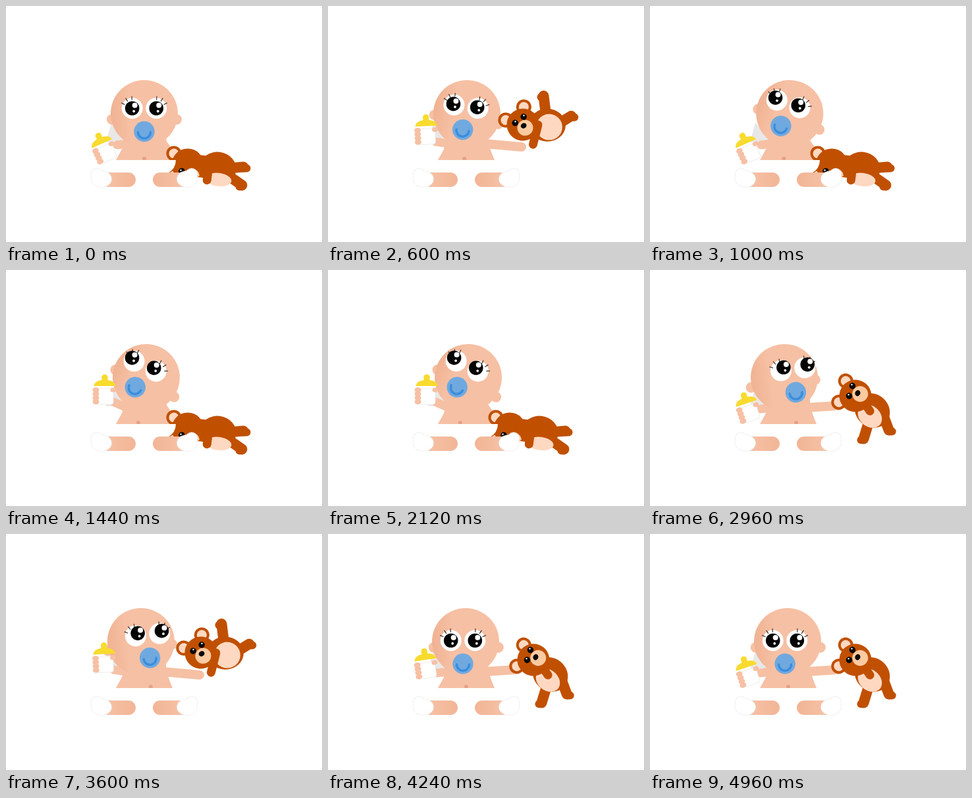
An HTML page with a canvas for the animation above (5000 ms loop, 480 by 360 pixels).

```html
<!DOCTYPE html>
<html lang="en">
<head>
<meta charset="utf-8">
<title>Baby with teddy</title>
<style>
html, body { margin: 0; width: 100%; height: 100%; overflow: hidden; background: #fff; }
canvas { display: block; width: 480px; height: 360px; }
</style>
</head>
<body>
<canvas id="stage" width="480" height="360"></canvas>
<script>
const c = document.getElementById('stage').getContext('2d');
const LOOP = 5000, STEP = 62.3, STEPS = 80, SHAKES = 15;
const SKIN = '#f6c0a4', SHADE = '#f0b292', FUR = '#c05000', PALE = '#ffd8c2', EDGE = '#ececec';
const RAD = Math.PI / 180;

// The baby looks around slowly: ahead, up to the bottle, up to the teddy, ahead.
const ahead = { x: 210, tilt: 0, faceX: 0, faceY: -8, gazeX: 0, gazeY: 0, navel: 210 };
const upLeft = { x: 213, tilt: 25, faceX: -9, faceY: -15, gazeX: -3, gazeY: -5, navel: 201 };
const upRight = { x: 204, tilt: -7, faceX: 14.5, faceY: -11, gazeX: 4, gazeY: -5, navel: 222 };
const settled = { ...ahead, x: 209, faceX: -4, faceY: -1.5 };
const looks = [
  [0, ahead], [1500, upLeft], [2250, upLeft], [2850, upRight],
  [3400, upRight], [4000, settled], [4940, settled], [LOOP, ahead]
];

// The teddy is beaten on the floor; spine, kick and flex are angles in degrees.
const floor = {
  x: 276, y: 242, tilt: -90, turn: -18, spine: 7, length: 46,
  kick: 28, flex: -10, belly: 17, reach: 20, handX: 254, handY: 232
};
const raised = {
  x: 296, y: 181, tilt: -36, turn: 0, spine: 1, length: 37,
  kick: -98, flex: -22, belly: 3, reach: 30, handX: 294, handY: 215
};
const hang = {
  x: 312, y: 192, tilt: -72, turn: 5, spine: 41, length: 34,
  kick: 66, flex: 9, belly: 9, reach: 3, handX: 285, handY: 207
};
const high = { ...raised, x: 304, y: 163, spine: -28, kick: -50, handX: 298, handY: 192 };
const shake = [
  [0, floor], [3, high], [5, floor], [6, floor], [8.5, high],
  [11, raised], [12, hang], [13, hang], [16, floor]
];

function poseAt(timeline, t) {
  const next = timeline.findIndex(([start]) => start > t);
  const [t0, a] = timeline[next - 1], [t1, b] = timeline[next];
  const k = (t - t0) / (t1 - t0), ease = k * k * (3 - 2 * k);
  const pose = {};
  for (const key in a) pose[key] = a[key] + (b[key] - a[key]) * ease;
  return pose;
}

function oval(x, y, rx, ry, fill) {
  c.beginPath();
  c.ellipse(x, y, rx, ry, 0, 0, 7);
  c.fillStyle = fill;
  c.fill();
}
const dot = (x, y, r, fill) => oval(x, y, r, r, fill);

function line(width, color, x0, y0, x1, y1) {
  c.beginPath();
  c.moveTo(x0, y0);
  c.lineTo(x1, y1);
  c.lineWidth = width;
  c.strokeStyle = color;
  c.stroke();
}

function shape(d, fill, stroke) {
  const path = new Path2D(d);
  c.fillStyle = fill;
  c.fill(path);
  if (stroke) {
    c.lineWidth = 1;
    c.strokeStyle = stroke;
    c.stroke(path);
  }
}

function at(x, y, deg, draw) {
  c.save();
  c.translate(x, y);
  c.rotate(deg * RAD);
  draw();
  c.restore();
}

function blend(x0, x1, ...colors) {
  const g = c.createLinearGradient(x0, 0, x1, 0);
  colors.forEach((color, i) => g.addColorStop(i / (colors.length - 1), color));
  return g;
}

function eye(x, y, side, p) {
  dot(x, y, 16, '#fff');
  for (let i = 0; i < 3; i++) {
    const a = (side * (2 + 31 * i) - 90) * RAD;
    const u = Math.cos(a), v = Math.sin(a);
    line(1.1, '#222', x + u * 13, y + v * 13, x + u * 18, y + v * 18);
  }
  at(x, y, -p.tilt, () => {
    dot(p.gazeX, p.gazeY, 10.8, '#050505');
    dot(p.gazeX + 4, p.gazeY - 4.5, 4, '#fff');
    dot(p.gazeX + 2.5, p.gazeY + 4.5, 1.9, '#fff');
  });
}

function head(p) {
  at(p.x, 164, p.tilt, () => {
    for (const side of [-1, 1]) dot(side * 49 - p.faceX * 0.2, 9, 8, SKIN);
    dot(0, 0, 51, blend(-51, -20, SHADE, SKIN));
    for (const side of [-1, 1]) eye(p.faceX + side * 18.3, p.faceY, side, p);
    const y = p.faceY + 35.5;
    dot(p.faceX, y, 15.7, '#70a9df');
    c.beginPath();
    c.arc(p.faceX, y + 1, 9.5, 0, Math.PI);
    c.lineWidth = 3.5;
    c.strokeStyle = '#3c8ddc';
    c.stroke();
  });
}

function bearHead(turn) {
  for (const x of [-17, 17]) {
    dot(x, -21, 11.5, FUR);
    dot(x, -21, 7.5, PALE);
  }
  dot(0, 0, 24.5, FUR);
  c.save();
  c.clip();
  dot(turn, 6, 12, '#fbcaa0');
  oval(turn, 2, 4.6, 4, '#080808');
  for (const x of [-8, 8]) {
    dot(turn + x, -9, 4.8, '#080808');
    dot(turn + x + 1.5, -10.5, 1.2, '#fff');
  }
  c.restore();
}

function bearLeg(x, y, hip, length, deg, toe) {
  const footX = x + length * Math.cos(deg * RAD), footY = y + length * Math.sin(deg * RAD);
  line(16, FUR, x + hip, y, footX, footY);
  line(12, FUR, footX, footY + 2, footX + toe, footY + 2);
}

function bear(p) {
  const x = p.x + p.length * Math.cos(p.spine * RAD);
  const y = p.y + p.length * Math.sin(p.spine * RAD);
  bearLeg(x, y, 0, 45, p.spine + p.kick, -4);
  bearLeg(x, y, 14, 39, p.spine + p.flex, 5);
  line(34, FUR, p.x, p.y, x, y);
  at(x, y, p.spine, () => {
    oval(0, 0, 28, 25, FUR);
    oval(3, p.belly, 20, 22 - p.belly * 0.7, PALE);
    line(13, FUR, -14, 0, -p.reach * 0.7, p.reach);
  });
  at(p.x, p.y, p.tilt, () => bearHead(p.turn));
}

function sock(x, side) {
  for (const [grow, fill] of [[0.8, EDGE], [0, '#fff']]) {
    oval(x, 264, 15 + grow, 12 + grow, fill);
    oval(x + side * 7, 257, 8.5 + grow, 9 + grow, fill);
  }
}

function bottle() {
  shape('M-12 4H13V24Q13 28 9 28H-8Q-12 28-12 24Z', '#fff', EDGE);
  dot(0, -13, 4.8, '#f8db2e');
  shape('M-17 0Q-15-8-5-9L-2-13H3L5-9Q15-8 17 0Z', '#f8db2e');
  for (let i = 0; i < 4; i++) oval(-13.5, 6 + i * 6, 5, 4, SKIN);
  oval(13, 6, 4.5, 3.5, SKIN);
}

function draw(ms) {
  const step = Math.min(STEPS - 1, Math.floor(ms / STEP + 0.1));
  const beat = step * SHAKES / STEPS % 1;
  const look = poseAt(looks, step * LOOP / STEPS);
  const teddy = poseAt(shake, beat * 16);
  const lift = 1 - Math.cos((beat + 0.075) * Math.PI) ** 6;
  const bottleY = 216 - 39 * lift;

  c.fillStyle = '#fff';
  c.fillRect(0, 0, 480, 360);
  c.lineCap = c.lineJoin = 'round';

  shape('M152 208L160 178L183 206Z', '#e9e7e7');
  line(13, SKIN, 183, 210, 170 - 7 * lift, Math.min(bottleY + 24, 212));
  line(14, SKIN, 238, 210, teddy.handX, teddy.handY);
  shape('M180 196C180 215 174 222 167 235H253C248 222 243 212 243 196Z', SKIN);
  dot(look.navel, 233, 3, '#e5a283');
  head(look);
  bear(teddy);

  shape('M163 235H258Q258 248 246 255L226 276H197L176 255Q163 248 163 235Z', '#fff');
  const legs = blend(155, 265, SKIN, SHADE, SKIN);
  line(22, legs, 155, 265, 186, 265.01);
  line(22, legs, 234, 265, 268, 265.01);
  sock(145, -1);
  sock(275, 1);
  at(145 + 5 * lift, bottleY, -30 * (1 - lift) ** 1.3, bottle);
}

function tick() {
  draw(performance.now() % LOOP);
  requestAnimationFrame(tick);
}
tick();
</script>
</body>
</html>
```
